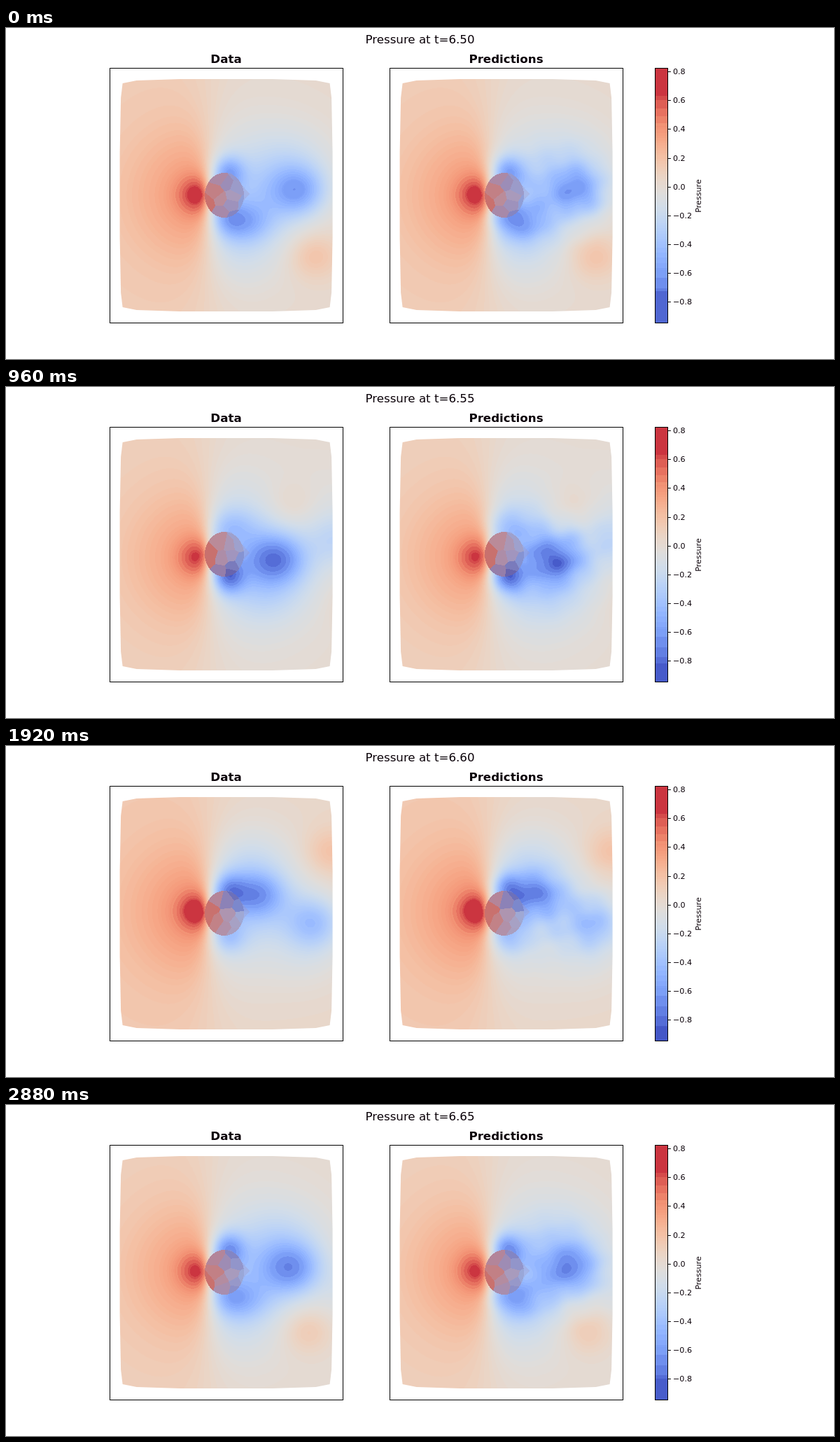
These frames come from a looping animation (1183x473 px, 3.04 s). An HTML page with a canvas:

```html
<!DOCTYPE html>
<html>
<head>
<meta charset="utf-8">
<style>
html, body { margin: 0; width: 100%; height: 100%; overflow: hidden; background: #fff; }
canvas, svg { position: absolute; left: 0; top: 0; width: 1183px; height: 473px; }
text { font-family: "DejaVu Sans", sans-serif; font-size: 11.11px; fill: #0a0008; }
.title { font-size: 16.67px; text-anchor: middle; }
.bold { font-weight: bold; }
.line { fill: none; stroke: #000; stroke-width: 1; }
</style>
</head>
<body>
<canvas id="field" width="1183" height="473"></canvas>
<svg viewBox="0 0 1183 473">
  <text id="clock" class="title" x="591.5" y="22"></text>
  <text class="title bold" x="314.5" y="50">Data</text>
  <text class="title bold" x="714.5" y="50">Predictions</text>
  <rect class="line" x="148.5" y="57.5" width="333" height="364"/>
  <rect class="line" x="548.5" y="57.5" width="333" height="364"/>
  <rect class="line" x="927.5" y="57.5" width="18" height="364"/>
  <g id="ticks"></g>
  <text transform="translate(993 240) rotate(-90)" text-anchor="middle">Pressure</text>
</svg>
<script>
const STEP_MS = 160, STEPS = 19, HALF = STEPS / 2;
const LEFT = 162, TOP = 72, W = 306, H = 334, MID_X = 314.6, MID = 239, PANEL_GAP = 400;
const VMIN = -0.945, VMAX = 0.828, BAR_SCALE = 205.6, BAR_ZERO = 227.2;
const ctx = document.getElementById('field').getContext('2d');
const buffer = document.createElement('canvas');
buffer.width = W;
buffer.height = H;
const bctx = buffer.getContext('2d');
const image = bctx.createImageData(W, H);

const COOLWARM = [[59, 76, 192], [141, 176, 254], [221, 221, 221], [244, 154, 123], [180, 4, 38]];
// One quarter of the mesh boundary, measured from its centre
const CORNER = [[66, 166], [128, 164], [148, 160], [150.5, 139], [152, 60]];

const clamp = (v, lo, hi) => Math.min(hi, Math.max(lo, v));
const mix = (a, b, k) => a.map((v, i) => v + (b[i] - v) * k);
const bell = (x, centre, width) => Math.exp(-(((x - centre) / width) ** 2));
const sigmoid = x => 1 / (1 + Math.exp(-x));
const wave = (phase, peak, period = STEPS) => Math.cos(2 * Math.PI * (phase - peak) / period);
const hash = n => { const s = Math.sin(n * 127.1 + 11.7) * 43758.5453; return s - Math.floor(s); };

// Catmull-Rom curve through the colour stops
function coolwarm(v) {
  const n = clamp((v - VMIN) / (VMAX - VMIN), 0, .9999) * 4;
  const i = Math.floor(n), t = n - i;
  const b = COOLWARM[i], c = COOLWARM[i + 1];
  const a = COOLWARM[i - 1] || mix(c, b, 2), d = COOLWARM[i + 2] || mix(b, c, 2);
  return b.map((p, k) => clamp(p + t / 2 * (c[k] - a[k]
    + t * (2 * a[k] - 5 * p + 4 * c[k] - d[k] + t * (3 * (p - c[k]) + d[k] - a[k]))), 0, 255));
}

// The extremes of the scale fall into a few broad bands
function banded(v, low) {
  if (v > .63) return .69;
  if (v < low) return (low + VMIN) / 2;
  const q = v > .42 ? .055 : v < -.58 ? .07 : v < -.4 ? .035 : .018;
  return (Math.floor(v / q) + .5) * q;
}

function makePalette(phase) {
  const low = -.72 - .13 * Math.abs(Math.sin(2 * Math.PI * phase / HALF));
  return Array.from({ length: 401 }, (_, i) => coolwarm(banded(-1 + i / 200, low)));
}

const colorAt = (palette, v) => palette[Math.round((clamp(v, -1, 1) + 1) * 200)];

// A vortex lingers behind the cylinder, then drifts downstream, trailed by a ridge on the far side
function vortexBlobs(age) {
  const x = 308 + 28 * Math.log(1 + Math.exp((age + 2.2) / 3));
  const y = 5 + 35 * sigmoid(3 - age) + 15 * sigmoid(age - 12);
  const strength = .42 * bell(age, 6, 9.5);
  const ridgeY = -88 * bell(age, 11, 10);
  return [
    [strength, x, y, 37, 27 + .7 * clamp(age, 0, 14)],
    [strength * .55, x - 8, y + 24, 62, 65],
    [-.18 * bell(age, 10, 5.5), x + 22, ridgeY, 36, 33]
  ];
}

function flowAt(phase) {
  const blobs = [[.08, 355, 0, 70, 52], [.15, 345, 14 * wave(phase, 6), 80, 100]];
  for (const side of [1, -1]) {
    const age = side > 0 ? phase : (phase + HALF) % STEPS;
    const shoulder = [.29 + .25 * wave(age, 6), 318, 31, 22, 24];
    for (const [a, x, y, sx, sy] of [shoulder, ...vortexBlobs(age), ...vortexBlobs(age - STEPS)])
      blobs.push([a, x, side * y, sx, sy]);
  }
  return { blobs, phase, offset: .026 * wave(phase, 2.3, HALF), frontY: MID + 4.5 * wave(phase, 5) };
}

function wake(flow, x, y) {
  let v = .025;
  for (const [a, cx, cy, sx, sy] of flow.blobs) {
    const dx = (x - cx) / sx, dy = (y - MID - cy) / sy, d = dx * dx + dy * dy;
    if (d < 9) v -= a * Math.exp(-d);
  }
  return v;
}

function pressure(flow, x, y) {
  const s = sigmoid((288 - x) / (3 + .1 * Math.abs(y - MID)));
  const d = (x - 272) ** 2 + (y - flow.frontY) ** 2;
  const front = .13 + .26 * Math.exp(-d / 9000) + (.33 + 2 * flow.offset) * Math.exp(-d / 600);
  return flow.offset + s * front + (1 - s) * wake(flow, x, y);
}

// The predicted field is the same flow, slightly warped and uneven in the wake
function roughPressure(flow, x, y) {
  const p = flow.phase, env = bell(x, 385, 75) * bell(y, MID, 62);
  const bump = Math.sin(x / 9 + y / 17 + p) * Math.sin(y / 8 - x / 21 + p * .7);
  const wx = x + 3 * env * Math.sin(y / 7 + p), wy = y + 3 * env * Math.sin(x / 8 - p);
  return pressure(flow, wx, wy) + .04 * env * bump;
}

// Coarse cells seen through the translucent cylinder
function cylinderCells(flow, palette) {
  const red = coolwarm(.57);
  return Array.from({ length: 12 }, (_, i) => {
    const angle = i * 2.4, r = 31 * Math.sqrt((i + .5) / 12), n = i + flow.phase * 17;
    const x = 314 + r * Math.cos(angle) + 10 * (hash(n) - .5);
    const y = MID + r * Math.sin(angle) + 10 * (hash(n + .5) - .5);
    const v = wake(flow, x, MID + (y - MID) * 1.2) + flow.offset;
    const heat = clamp((346 - x) / 62 * (1.25 + v), .1, .9);
    return { x, y, color: mix(mix(colorAt(palette, v), red, heat), [128, 128, 140], .22) };
  });
}

function nearest(cells, x, y) {
  let best = cells[0], min = Infinity;
  for (const c of cells) {
    const d = (c.x - x) ** 2 + (c.y - y) ** 2;
    if (d < min) { min = d; best = c; }
  }
  return best;
}

function drawPanel(flow, palette, field, shift) {
  const cells = cylinderCells(flow, palette);
  let k = 0;
  for (let j = 0; j < H; j++) {
    for (let i = 0; i < W; i++) {
      const x = LEFT + i + .5, y = TOP + j + .5;
      const inside = ((x - 312) / 28) ** 2 + ((y - MID) / 32) ** 2 < 1;
      let color = inside ? nearest(cells, x, y).color : colorAt(palette, field(flow, x, y));
      const lobe = Math.abs(y - MID + 2) / 30 + Math.max(0, x - 322) / 26;
      if (!inside && x > 316 && lobe < 1) color = mix(color, [165, 150, 185], .3);
      image.data.set([...color, 255], k);
      k += 4;
    }
  }
  bctx.putImageData(image, 0, 0);
  ctx.save();
  ctx.translate(shift, 0);
  ctx.beginPath();
  for (const [sx, sy] of [[1, -1], [1, 1], [-1, 1], [-1, -1]]) {
    const points = sx * sy < 0 ? CORNER : [...CORNER].reverse();
    for (const [x, y] of points) ctx.lineTo(MID_X + sx * x, MID + sy * y);
  }
  ctx.closePath();
  ctx.clip();
  ctx.drawImage(buffer, LEFT, TOP);
  ctx.restore();
}

function drawBar(palette) {
  for (let y = 57; y < 421; y++) {
    const color = colorAt(palette, (BAR_ZERO - y - .5) / BAR_SCALE);
    ctx.fillStyle = `rgb(${color.map(Math.round)})`;
    ctx.fillRect(928, y, 18, 1);
  }
}

function drawStep(step) {
  const flow = flowAt(step), palette = makePalette(step);
  ctx.clearRect(0, 0, 1183, 473);
  drawPanel(flow, palette, pressure, 0);
  drawPanel(flow, palette, roughPressure, PANEL_GAP);
  drawBar(palette);
  document.getElementById('clock').textContent = 'Pressure at t=' + (6.504 + step * .0083).toFixed(2);
}

let ticks = '';
for (let i = -4; i <= 4; i++) {
  const y = Math.floor(BAR_ZERO - i * .2 * BAR_SCALE) + .5;
  const label = (i < 0 ? '\u2212' : '') + Math.abs(i * .2).toFixed(1);
  ticks += `<path class="line" d="M946 ${y}h3.9"/><text x="953" y="${y + 3.5}">${label}</text>`;
}
document.getElementById('ticks').innerHTML = ticks;

let shown = -1;
function tick() {
  const step = Math.floor(performance.now() / STEP_MS) % STEPS;
  if (step !== shown) drawStep(shown = step);
  requestAnimationFrame(tick);
}
tick();
</script>
</body>
</html>
```
